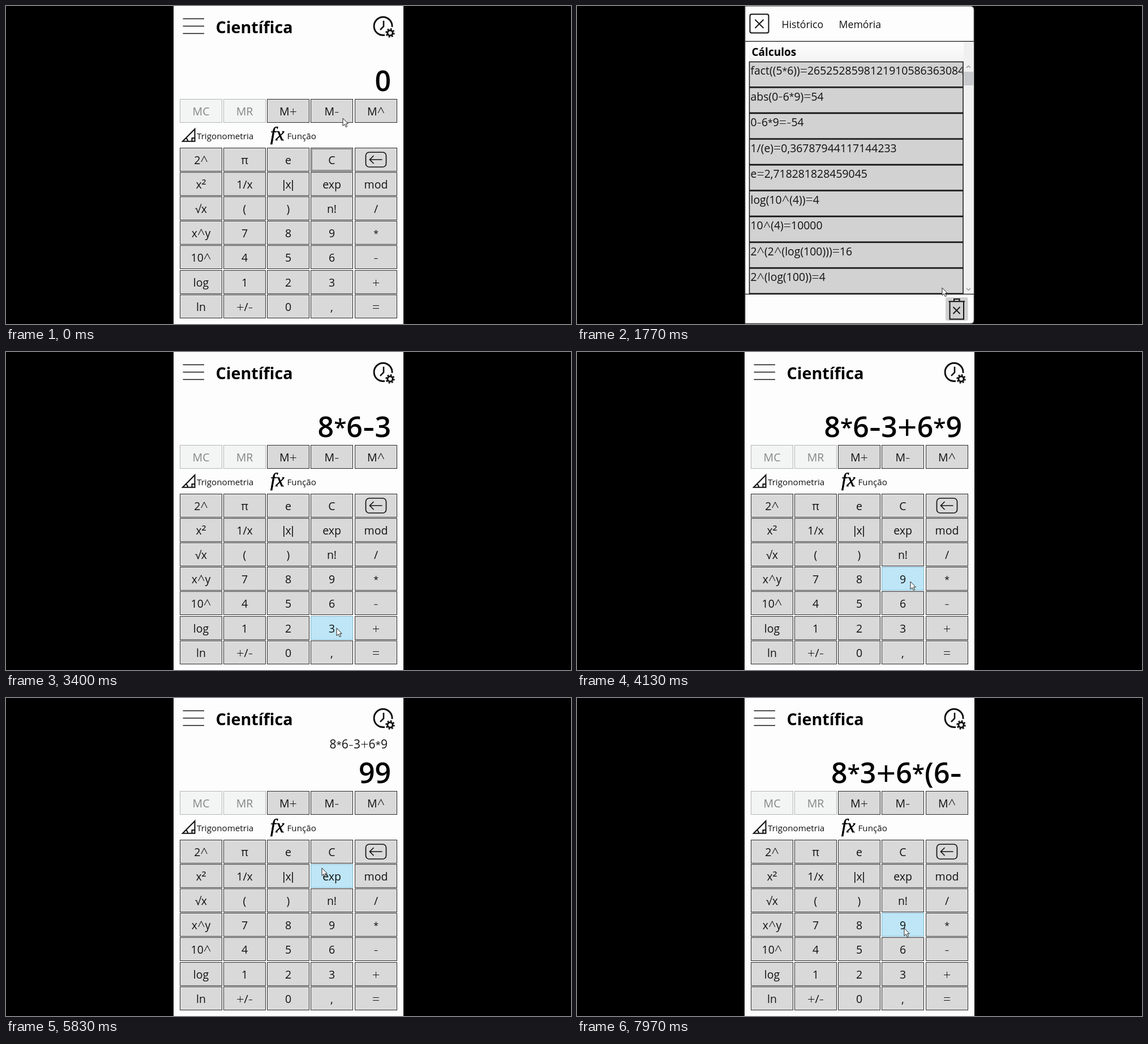
These frames come from a looping animation (998x561 px, 8000 ms). An HTML page:

```html
<!DOCTYPE html>
<html lang="pt">
<head>
<meta charset="utf-8">
<title>Calculadora</title>
<style>
html, body { margin: 0; width: 100%; height: 100%; overflow: hidden; background: #000; }
svg { display: block; width: 100vw; height: 100vh; font-family: "Open Sans", "Noto Sans", sans-serif; }
.line { fill: none; stroke: #111; }
</style>
</head>
<body>
<svg id="stage" viewBox="0 0 998 561"></svg>
<script>
const LOOP = 8000, LAG = 60, OPEN = 420, CLOSE = 2120;
const VALUE_SIZE = 50, EXPR_SIZE = 21;
const KEYS = [
  '2^ π e C ←', 'x² 1/x |x| exp mod', '√x ( ) n! /', 'x^y 7 8 9 *',
  '10^ 4 5 6 -', 'log 1 2 3 +', 'ln +/- 0 , ='
].map(row => row.split(' '));
const MEMORY = ['MC', 'MR', 'M+', 'M-', 'M^'];
const HISTORY = [
  'fact((5*6))=265252859812191058636308480000000', 'abs(0-6*9)=54', '0-6*9=-54',
  '1/(e)=0,36787944117144233', 'e=2,718281828459045', 'log(10^(4))=4',
  '10^(4)=10000', '2^(2^(log(100)))=16', '2^(log(100))=4'
];
// operator glyphs: relative size, baseline shift in em, extra attributes
const THIN = 'font-weight="lighter"';
const OPS = {
  '*': [.81, -.07, ''], '+': [1.22, .1, THIN], '-': [1.34, .09, THIN],
  '^': [1.22, .17, THIN], '=': [1.2, .08, THIN], '²': [1.18, 0, ''],
  '|': [1, 0, 'font-family="Liberation Sans, sans-serif"']
};

// pointer path: [time, key to press] or [time, x, y]
const PATH = [
  [-100, 600, 222], [0, 595, 198], [350, 667, 38], [480, 667, 38], [900, 600, 120],
  [1250, 500, 34], [1600, 670, 535], [1700, 668, 532], [1770, 645, 497], [2080, 322, 32],
  [2150, 322, 32], [2380, '8'], [2560, 650, 441], [2630, 655, 425], [2720, '*'],
  [2930, '6'], [3130, '-'], [3360, '3'], [3560, '+'], [3760, '6'], [3930, '*'],
  [4080, '9'], [4130, 589, 405], [4450, '='], [5300, 653, 531], [5740, 556, 326],
  [5830, 558, 300], [5930, 'C'], [6160, '8'], [6380, '*'], [6580, '3'], [6760, '+'],
  [6910, 580, 410], [6970, 574, 420], [7060, '6'], [7240, '*'], [7460, '('],
  [7640, '6'], [7820, '-'], [7970, 578, 406], [8000, 577, 404]
];

// edges snap to whole pixels so the borders stay crisp
const keyBox = (col, row) => ({
  x: Math.round(306.9 + 77.15 * col) + .5,
  y: (row < 0 ? 164 : Math.round(250 + 43.1 * row)) + .5,
  w: 74, h: 41
});
const inside = (b, x, y) => x >= b.x && x <= b.x + b.w && y >= b.y && y <= b.y + b.h;

function rich(s, size) {
  let shift = 0;
  return s.split(/([*+=^|²-])/).filter(Boolean).map(part => {
    const [k, dy, attrs] = OPS[part] || [1, 0, ''];
    const span = `<tspan font-size="${k * size}" dy="${(dy - shift) * size}" ${attrs}>${part}</tspan>`;
    shift = dy;
    return span;
  }).join('');
}
const text = (s, x, y, size, attrs = '') => `<text x="${x}" y="${y}" font-size="${size}" ${attrs}>${rich(s, size)}</text>`;
const line = (d, w, attrs = '') => `<path class="line" d="${d}" stroke-width="${w}" ${attrs}/>`;
const rect = (x, y, w, h, attrs) => `<rect x="${x}" y="${y}" width="${w}" height="${h}" ${attrs}/>`;

const buttons = [];
function button(label, col, row) {
  const b = keyBox(col, row), off = row < 0 && col < 2;
  const cx = b.x + b.w / 2;
  buttons.push({ ...b, label, off });
  const face = label === '←'
    ? rect(cx - 18, b.y + 7.5, 36, 26, 'rx="6" class="line" stroke-width="1.7"') +
      line(`M${cx + 11} ${b.y + 20.5}h-22m7-7l-7 7l7 7`, 1.7)
    : text(label, cx, b.y + 28.5, 19.5, `text-anchor="middle" fill="${off ? '#858585' : '#111'}"`);
  return rect(b.x, b.y, b.w, b.h, `class="key" fill="${off ? '#f3f4f4' : '#d9d9d9'}" stroke="${off ? '#b3b6b8' : '#2a2a2a'}"`) + face;
}

function calculator() {
  return rect(296, 0, 406, 561, 'fill="#fdfdfd"') +
    line('M312.5 22.5h37.5M312.5 35.5h37.5M312.5 48.5h37.5', 1.6) +
    text('Científica', 370.5, 47.5, 28.7, 'font-weight="700"') +
    line('M669 51.3A16 16 0 1 1 682 37', 3) +
    line('M667 26v10l-6 6', 2.6) +
    `<circle cx="678.5" cy="47.5" r="8" fill="#fdfdfd"/>
     <circle cx="678.5" cy="47.5" r="4.6" class="line" stroke-width="3"/>
     <circle cx="678.5" cy="47.5" r="7" class="line" stroke-width="2.4" stroke-dasharray="2.9 2.6"/>` +
    `<text id="expr" x="674" y="89" font-size="${EXPR_SIZE}" text-anchor="end" fill="#111"></text>` +
    `<text id="value" x="680" y="150" font-size="${VALUE_SIZE}" font-weight="600" text-anchor="end"></text>` +
    MEMORY.map((m, i) => button(m, i, -1)).join('') +
    line('M312 238.8L333.5 217V238.8ZM328.5 238v-5h5M318 233q3 2 3 5', 2.1) +
    text('Trigonometria', 337, 234.5, 15.2, 'fill="#111"') +
    '<text x="467" y="237" font-size="34" font-style="italic" font-family="Liberation Serif, serif" stroke="#000" stroke-width=".6">fx</text>' +
    text('Função', 496.5, 234.5, 15.2, 'fill="#111"') +
    KEYS.map((row, r) => row.map((k, c) => button(k, c, r)).join('')).join('') +
    rect(540.5, 252.5, 70, 37, 'id="focus" class="line" stroke-dasharray="1 1"');
}

function history() {
  const pitch = 45.55;
  const rows = HISTORY.map((s, i) => {
    const y = 98.5 + pitch * i;
    return rect(304.5, y, 377.5, pitch - 1.3, 'fill="#d2d2d2" stroke="#111" stroke-width="1.5"') +
      text(s, 306.5, y + 22.5, 19.4, 'fill="#111" clip-path="url(#listClip)"');
  }).join('');
  return rect(296, 0, 406, 561, 'fill="#000"') +
    '<path d="M297 .5H695q6 0 6 6V554q0 6-6 6H297Z" fill="#fdfdfd" stroke="#777"/>' +
    rect(305.5, 14.5, 33, 33, 'rx="3" class="line" stroke-width="2"') +
    line('M314.5 24l15 15m0-15l-15 15', 1.9) +
    text('Histórico', 361.5, 39, 17.7, 'fill="#111"') +
    text('Memória', 462.5, 39, 17.7, 'fill="#111"') +
    rect(304, 63, 379, 35, 'fill="url(#head)"') +
    rect(683, 63, 17.5, 445, 'fill="#f0f0f0"') +
    rect(683.5, 116, 16.5, 24, 'fill="#c8c9cc"') +
    line('M688 109l3.5-3.5l3.5 3.5M688 498l3.5 3.5l3.5-3.5', 1.2, 'style="stroke:#888"') +
    text('Cálculos', 308.5, 88, 19, 'font-weight="700"') + rows +
    line('M297 62.3H701M297 508.3H701', 1.2) +
    rect(651, 514, 39.5, 41, 'id="bin" rx="3" fill="#d0d0d0"') +
    line('M656.5 521.2h28.5M666 521v-4h9.5v4M658.5 521.5v31h24.5v-31', 2) +
    line('M664.5 531l12 12m0-12l-12 12', 1.8);
}

const stage = document.getElementById('stage');
stage.innerHTML = `<defs>
  <clipPath id="listClip"><rect x="304" y="98" width="376.5" height="411"/></clipPath>
  <linearGradient id="head" x2="0" y2="1"><stop stop-color="#fdfdfd"/><stop offset="1" stop-color="#f3f3f4"/></linearGradient>
  </defs><g id="calc">${calculator()}</g><g id="panel">${history()}</g>
  <path id="pointer" d="M0 0V13.5L3.2 10.6L5.4 15.6L7.6 14.6L5.4 9.8H9.3Z" fill="#fff" stroke="#222"/>`;

const $ = id => document.getElementById(id);
const keyRects = [...document.querySelectorAll('.key')];
const show = (el, on) => el.setAttribute('visibility', on ? 'visible' : 'hidden');
const bin = { x: 651, y: 514, w: 40, h: 41 };

const stops = PATH.map(([t, a, y]) => {
  if (typeof a === 'number') return { t, x: a, y };
  const b = buttons.find(k => k.label === a);
  return { t, x: b.x + b.w / 2, y: b.y + b.h / 2, key: a };
});

function pointerAt(t) {
  let i = 1;
  while (i < stops.length - 1 && stops[i].t < t) i++;
  const a = stops[i - 1], b = stops[i];
  const u = Math.min(1, Math.max(0, (t - a.t) / (b.t - a.t)));
  const e = u * u * (3 - 2 * u);
  return [a.x + (b.x - a.x) * e, a.y + (b.y - a.y) * e];
}

function displayAt(t) {
  let value = '0', expr = '';
  for (const s of stops) {
    if (!s.key || s.t + 20 > t) continue;
    if (s.key === 'C') { value = '0'; expr = ''; }
    else if (s.key === '=') { expr = value; value = '99'; }
    else value = value === '0' ? s.key : value + s.key;
  }
  return [value, expr];
}

function setRich(el, s, size) {
  if (el.shown === s) return;
  el.shown = s;
  el.innerHTML = rich(s, size);
}

function draw(t) {
  const open = t >= OPEN && t < CLOSE;
  const [x, y] = pointerAt(t), [hx, hy] = pointerAt(t - LAG);
  const [value, expr] = displayAt(t);
  show($('panel'), open);
  show($('bin'), open && inside(bin, hx, hy));
  show($('focus'), t < OPEN);
  setRich($('value'), value, VALUE_SIZE);
  setRich($('expr'), expr, EXPR_SIZE);
  buttons.forEach((b, i) => {
    if (b.off) return;
    const hot = !open && inside(b, hx, hy);
    keyRects[i].setAttribute('fill', hot ? '#bee6f7' : '#d9d9d9');
    keyRects[i].setAttribute('stroke', hot ? '#7fb4cf' : '#2a2a2a');
  });
  $('pointer').setAttribute('transform', `translate(${x} ${y})`);
}

const start = performance.now();
function tick() {
  draw((performance.now() - start) % LOOP);
  requestAnimationFrame(tick);
}
draw(0);
requestAnimationFrame(tick);
</script>
</body>
</html>
```
